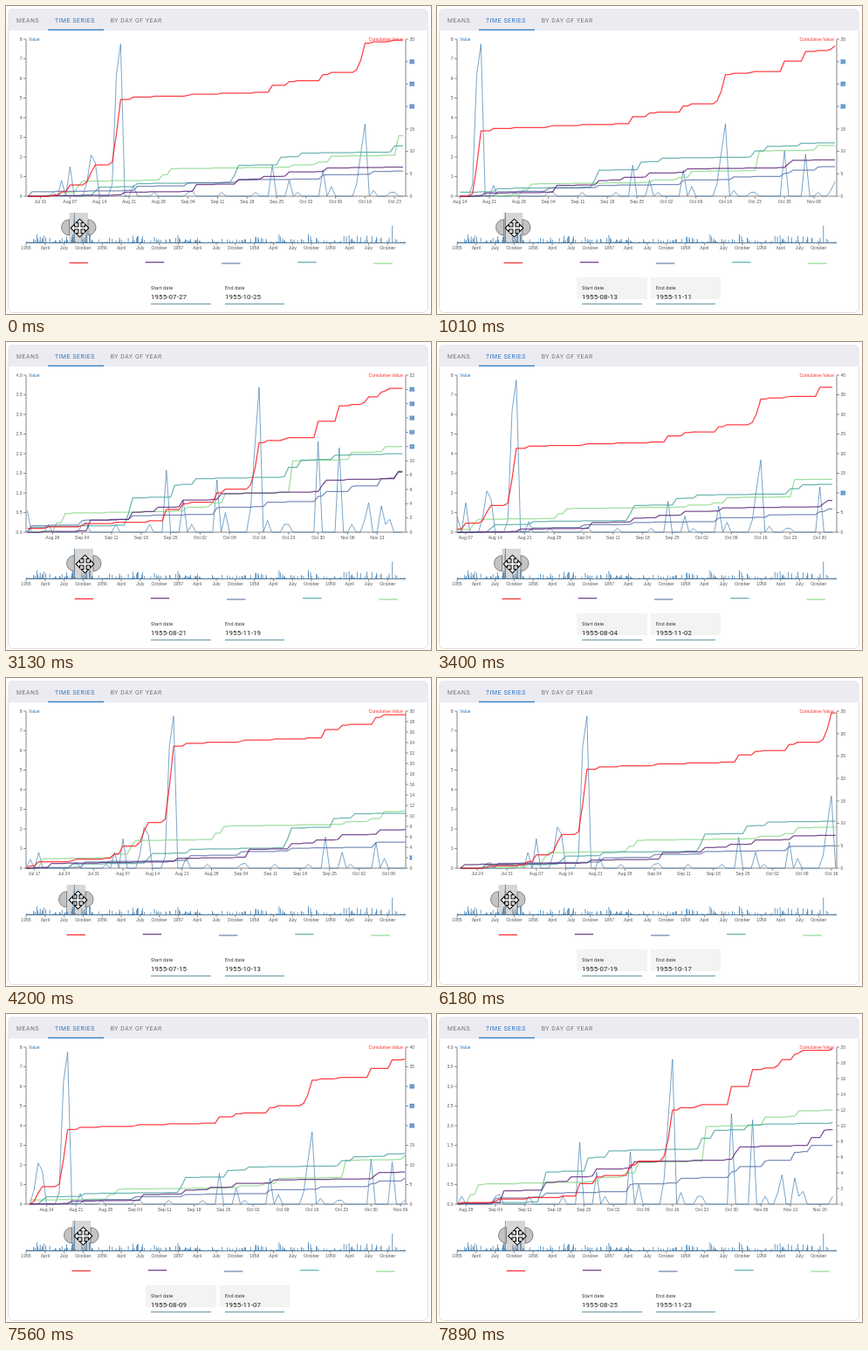
Write an HTML page with a canvas that moves like this. It is 487 by 353 pixels and loops after 7.99 s.

```html
<!DOCTYPE html>
<html lang="en">
<head>
<meta charset="utf-8">
<title>Time series brush</title>
<style>
html, body { margin: 0; width: 100%; height: 100%; overflow: hidden; background: #fff; }
canvas { display: block; width: 487px; height: 353px; }
</style>
</head>
<body>
<canvas id="stage"></canvas>
<script>
const W = 487, H = 353, LOOP = 7990;
const canvas = document.getElementById('stage');
const ctx = canvas.getContext('2d');
const dpr = window.devicePixelRatio || 1;
canvas.width = W * dpr;
canvas.height = H * dpr;

const LEFT = 23, RIGHT = 457.7, TOP = 38, BASE = 218;
const SPAN = 90, DAYS = 135, STEP = 4.19;       // days per pixel of dragging
const DAY0 = Date.UTC(1955, 6, 15), DAY_MS = 864e5;
const PX_DAY = (RIGHT - LEFT) / SPAN;
const MINI = 0.2387, YEAR = 87.2, MINI_BASE = 271.5;
const AXIS = '"Liberation Sans", Arial, sans-serif';
const UI = 'Roboto, sans-serif';
const BLUE = '#4682b4';
const COLORS = ['#ff0f17', '#5a2379', '#5d74a8', '#4ba69f', '#87d787'];

// Main events of a year by day after July 15; a small amount recurs every eighth day.
function season(events, phase, drift) {
  return Array.from({ length: DAYS }, (_, d) => events[d] ?? (d % 8 === phase ? drift : 0));
}
const daily = [
  season({ 1: .45, 3: .8, 12: .3, 21: .8, 23: 1.5, 27: .7, 28: 2.1, 29: 1.7, 33: .6, 34: 6.2,
    35: 7.75, 38: .55, 52: .25, 71: 1.58, 75: .82, 77: .2, 83: 1.33, 85: .5, 91: .62, 92: 2.2,
    93: 3.69, 95: .3, 100: .2, 107: 2.31, 112: 2.15, 118: .3, 119: .75, 122: .67, 124: .33 }, 3, .2),
  season({ 6: .8, 36: .6, 53: 1.5, 63: 1, 69: .6, 75: .9, 84: .8, 108: .9, 109: .7, 126: 1, 129: .9 }, 2, .1),
  season({ 14: 1, 39: .9, 51: .6, 63: .5, 83: .9, 95: .6, 107: .7, 109: .6, 115: .7, 122: 1, 126: .8 }, 4, .1),
  season({ 11: .7, 29: .9, 30: .9, 39: .7, 62: 1.6, 63: 2.2, 73: 1.7, 78: .8, 100: 1.3, 103: 1, 111: .6 }, 3, .1),
  season({ 4: 1.7, 21: .7, 25: 1.5, 26: 1.1, 45: 1.2, 47: 1.3, 76: .5, 82: .5, 85: 1.3, 101: 4.4, 115: 1, 123: .7 }, 1, .1)
];

// Drags: begin, end, updates, offset reached.
const drags = [
  [300, 600, 5, 6], [940, 1010, 2, 7], [1280, 1420, 3, 9], [3190, 3480, 8, 4], [3850, 4200, 6, 0],
  [6180, 6370, 4, 2], [6810, 7020, 4, 4], [7260, 7350, 2, 5], [7500, 7890, 8, 10]
];

function stateAt(t) {
  let p = 3, shaded = false;
  for (const [begin, end, count, target] of drags) {
    if (t < begin) break;
    const k = Math.min(count, 1 + Math.floor((t - begin) / (end - begin) * (count - 1)));
    p += Math.round((target - p) * k / count);
    shaded = k < count || target === 7;         // the pointer is still held at 7
    if (t < end) break;
  }
  const ahead = t >= 4130 || (t >= 1630 && t < 3130) ? 1 : 0;
  return { p, shaded, cursor: p + (p === 10 ? 0.5 : ahead) };
}

function text(str, x, y, size, color, align = 'left', font = AXIS, spacing = 0) {
  ctx.font = `${size}px ${font}`;
  ctx.letterSpacing = spacing + 'px';
  ctx.textAlign = align;
  ctx.textBaseline = 'alphabetic';
  ctx.fillStyle = color;
  ctx.fillText(str, x, y);
}

function line(x1, y1, x2, y2, color, width = 1) {
  ctx.strokeStyle = color;
  ctx.lineWidth = width;
  ctx.beginPath();
  ctx.moveTo(x1, y1);
  ctx.lineTo(x2, y2);
  ctx.stroke();
}

function box(x, y, w, h, color) {
  ctx.fillStyle = color;
  ctx.fillRect(x, y, w, h);
}

function plot(points, color, width) {
  ctx.strokeStyle = color;
  ctx.lineWidth = width;
  ctx.lineJoin = 'round';
  ctx.beginPath();
  points.forEach(([x, y]) => ctx.lineTo(x, y));
  ctx.stroke();
}

function random(seed) {
  return () => {
    seed = (seed * 1664525 + 1013904223) % 4294967296;
    return seed / 4294967296;
  };
}

// Tick step and rounded top for about ten ticks.
function niceScale(max) {
  const raw = max / 10, power = 10 ** Math.floor(Math.log10(raw)), r = raw / power;
  const step = power * (r >= Math.sqrt(50) ? 10 : r >= Math.sqrt(10) ? 5 : r >= Math.sqrt(2) ? 2 : 1);
  return { step, top: Math.ceil(max / step - 1e-6) * step };
}

const dateOf = day => new Date(DAY0 + day * DAY_MS);
const isoDate = day => dateOf(day).toISOString().slice(0, 10);
const tickDate = day => dateOf(day).toLocaleDateString('en-US', { month: 'short', day: '2-digit', timeZone: 'UTC' });

function drawCard() {
  box(0, 0, W, H, '#fff');
  ctx.strokeStyle = '#dedee2';
  ctx.lineWidth = 1;
  ctx.beginPath();
  ctx.roundRect(2.5, 3.5, 481, 348, 6);
  ctx.stroke();
  ctx.fillStyle = '#ebebf1';
  ctx.beginPath();
  ctx.roundRect(2, 3, 482, 25, [6, 6, 0, 0]);
  ctx.fill();
  text('MEANS', 12, 19, 6.8, '#737378', 'left', UI, 0.6);
  text('TIME SERIES', 56, 19, 6.8, '#2874bd', 'left', UI, 0.6);
  text('BY DAY OF YEAR', 119.7, 19, 6.8, '#737378', 'left', UI, 0.6);
  box(48, 26.7, 64, 1.3, '#2f7bc2');
}

// Label range on the right axis that is text-selected.
function selectedRange(p) {
  if (p < 2) return [2, 2];
  if (p === 5) return [10, 10];
  if (p === 9) return [12, 20];
  return p === 10 ? [1, 0] : [20, 30];
}

function drawChart(p) {
  const start = p * STEP;
  const first = Math.ceil(start), last = Math.floor(start + SPAN);
  const xOf = day => LEFT + (day - start) * PX_DAY;
  const sums = daily.map(days => {
    let sum = 0;
    return days.slice(first, last + 1).map(v => sum += v);
  });
  const values = daily[0].slice(first, last + 1);
  const left = niceScale(Math.max(...values));
  const right = niceScale(Math.max(...sums.map(s => s[s.length - 1])));
  const yOf = (v, scale) => BASE - v / scale.top * (BASE - TOP);
  const ink = '#555';

  line(LEFT, TOP, LEFT, BASE, '#666', 0.8);
  line(458, TOP, 458, BASE, '#666', 0.8);
  line(LEFT, BASE, 458, BASE, '#666', 0.8);

  for (let i = 0; i * left.step <= left.top + 1e-6; i++) {
    const v = i * left.step, y = yOf(v, left);
    line(20, y, LEFT, y, '#666', 0.7);
    text(v.toFixed(left.step < 1 ? 1 : 0), 18.6, y + 1.8, 5.1, ink, 'right');
  }
  const [lo, hi] = selectedRange(p);
  for (let v = 0; v <= right.top + 1e-6; v += right.step) {
    const y = yOf(v, right), on = v >= lo && v <= hi;
    line(458, y, 461, y, '#666', 0.7);
    if (on) box(462.3, y - 2.8, v > 9 ? 5.7 : 3, 5.6, '#8fbbe8');
    text(String(v), 462.5, y + 1.8, 5.1, on ? '#285f96' : ink);
  }
  for (let day = 2; day <= start + SPAN; day += 7) {
    if (day < start) continue;
    const x = xOf(day);
    line(x, BASE, x, BASE + 3, '#666', 0.7);
    text(tickDate(day), x, 226.3, 5.1, ink, 'center');
  }

  const curve = (list, scale) => list.map((v, i) => [xOf(first + i), yOf(v, scale)]);
  ctx.globalAlpha = 0.8;
  plot(curve(values, left), BLUE, 0.9);
  for (let i = 4; i >= 0; i--) plot(curve(sums[i], right), COLORS[i], 1.25);
  ctx.globalAlpha = 1;
  text('Value', 26, 40.2, 5.1, '#3577b5');
  text('Cumulative Value', 455, 40.2, 5.1, '#f33', 'right');
}

function drawOverview(p, cursor) {
  const months = ['', 'April', 'July', 'October'];
  const rnd = random(1955);
  for (let day = 0; day < 1820; day++) {
    const r = rnd(), size = rnd();
    const year = Math.floor(day / 365.25);
    const known = daily[year][Math.floor(day - year * 365.25) - 195];
    const h = known !== undefined ? known * 4.5 : r > 0.78 ? 0.8 + 9 * size ** 5 : 0.4;
    box(LEFT + day * MINI, MINI_BASE - h, 0.8, h, BLUE);
  }
  line(LEFT, MINI_BASE, 458, MINI_BASE, '#4f7593', 0.9);
  for (let i = 0; i < 20; i++) {
    const x = LEFT + i * YEAR / 4;
    line(x, MINI_BASE, x, MINI_BASE + 3, '#666', 0.7);
    text(months[i % 4] || String(1955 + i / 4), x, 279.2, 5.1, '#555', 'center');
  }

  const x0 = LEFT + (195 + p * STEP) * MINI, w = SPAN * MINI;
  box(x0, 237, w, 34.5, 'rgba(119,119,119,0.3)');
  for (const [x, flip] of [[x0, true], [x0 + w, false]]) {
    ctx.beginPath();
    ctx.arc(x, 253.7, 9, -Math.PI / 2, Math.PI / 2, flip);
    ctx.closePath();
    ctx.fillStyle = 'rgba(180,180,180,0.8)';
    ctx.fill();
    ctx.strokeStyle = '#777';
    ctx.lineWidth = 0.9;
    ctx.stroke();
  }
  ctx.globalAlpha = 0.85;
  COLORS.forEach((color, i) => {
    const x = x0 + i * YEAR, y = i === 2 || i === 4 ? 295 : i ? 293.7 : 294.4;
    line(x, y, x + w, y, color, 1.3);
  });
  ctx.globalAlpha = 1;
  drawCursor(81.5 + cursor, 254.5);
}

function drawCursor(x, y) {
  ctx.save();
  ctx.translate(x, y);
  ctx.beginPath();
  for (let i = 0; i < 4; i++) {
    const c = Math.cos(i * Math.PI / 2), s = Math.sin(i * Math.PI / 2);
    for (const [a, b] of [[-1.5, -1.5], [-1.5, -6], [-4.3, -6], [0, -10.3], [4.3, -6], [1.5, -6]])
      ctx.lineTo(a * c - b * s, a * s + b * c);
  }
  ctx.closePath();
  ctx.fillStyle = '#fff';
  ctx.fill();
  ctx.strokeStyle = '#111';
  ctx.lineWidth = 1.1;
  ctx.lineJoin = 'miter';
  ctx.stroke();
  ctx.restore();
}

function drawField(x, w, label, value, shaded) {
  if (shaded) box(x - 6, 311, w + 12, 25, '#f3f3f3');
  text(label, x, 324.8, 5.6, '#333', 'left', UI, 0.1);
  text(value, x, 335.6, 7.9, '#222', 'left', UI, 0.12);
  line(x, 341.5, x + w, 341.5, '#5a8a9c', 0.9);
}

function draw(t) {
  const { p, cursor, shaded } = stateAt(t);
  ctx.setTransform(dpr, 0, 0, dpr, 0, 0);
  drawCard();
  drawChart(p);
  drawOverview(p, cursor);
  const day = Math.floor(p * STEP);
  drawField(166, 69, 'Start date', isoDate(day), shaded);
  drawField(251, 68, 'End date', isoDate(day + SPAN), shaded);
}

const begin = performance.now();
function tick() {
  draw((performance.now() - begin) % LOOP);
  requestAnimationFrame(tick);
}
tick();
</script>
</body>
</html>
```
